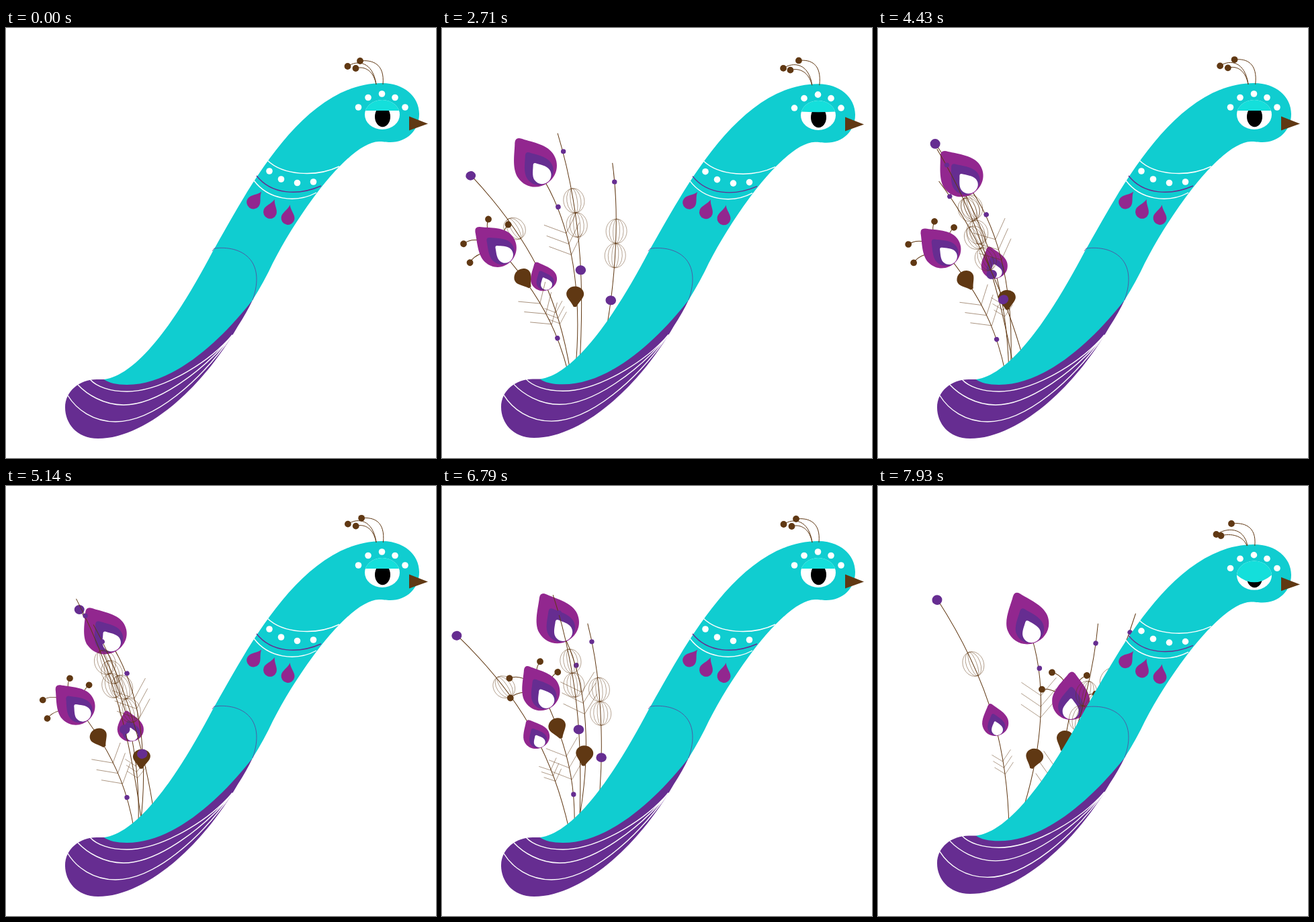
Animation, 640 px wide and 640 px high, one loop 8 s. Source, as an HTML page:

```html
<!DOCTYPE html>
<html lang="en">
<head>
<meta charset="utf-8">
<title>Peacock</title>
<style>
html, body { margin: 0; width: 100%; height: 100%; overflow: hidden; background: #fff; }
svg { display: block; width: 100vw; height: 100vh; }
</style>
</head>
<body>
<svg id="stage" viewBox="0 0 640 640"></svg>
<script>
const LOOP = 8000;
const TEAL = '#10cdd0', LID = '#14dfdb', PURPLE = '#662d91', MAGENTA = '#92278f', BROWN = '#603813';

// Motion helpers
const ease = (t, from, to) => {
  const u = Math.min(1, Math.max(0, (t - from) / (to - from)));
  return u * u * (3 - 2 * u);
};
const wave = (t, peak, period) => Math.cos(2 * Math.PI * (t - peak) / period);
const mix = (a, b, u) => a + (b - a) * u;

// Markup helpers
const dot = (x, y, r, fill, rx = r) => `<ellipse cx="${x}" cy="${y}" rx="${rx}" ry="${r}" fill="${fill}"/>`;
const line = (d, stroke, width, extra = '') =>
  `<path d="${d}" fill="none" stroke="${stroke}" stroke-width="${width}" ${extra}/>`;
const shape = (d, fill, extra = '') => `<path d="${d}" fill="${fill}" ${extra}/>`;
const at = (x, y, angle, scale, inner) =>
  `<g transform="translate(${x} ${y}) rotate(${angle}) scale(${scale})">${inner}</g>`;
const stem = d => line(d, BROWN, 1);

const EYE = 'M-5 -33Q0 -39 5 -33C12 -23 28 -8 28 7C28 24 15 35 0 35C-15 35 -28 24 -28 7C-28 -8 -12 -23 -5 -33Z';
const eyespot = (x, y, angle, scale) => at(x, y, angle, scale,
  shape(EYE, MAGENTA) +
  shape(EYE, PURPLE, 'transform="translate(0 10.5) scale(.67)"') +
  shape(EYE, '#fff', 'transform="translate(0 19) scale(.43)"'));

const bud = (x, y, angle) => at(x, y, angle, 1,
  shape('M-2 17C-6 9 -13 4 -13 -2A13 11.5 0 0 1 13 -2C13 4 6 9 2 17Z', BROWN));

const cage = (x, y, angle) => at(x, y, angle, 1, [15.5, 10.5, 5].map(rx =>
  `<ellipse rx="${rx}" ry="19" fill="none" stroke="${BROWN}" stroke-width=".7" opacity=".65"/>`).join(''));

// Three V-shaped barbs stepping down along the stem
const barbs = (x, y, stepX, stepY, left, right) => [0, 1, 2].map(i => {
  const px = x + i * stepX, py = y + i * stepY;
  return line(`M${px + left[0]} ${py + left[1]}L${px} ${py}L${px + right[0]} ${py + right[1]}`,
    BROWN, .7, 'opacity=".7"');
}).join('');

const antenna = (x, y, cx, cy, ex, ey) =>
  line(`M${x} ${y}Q${cx} ${cy} ${ex} ${ey}`, BROWN, 1) + dot(x, y, 4.9, BROWN);

// Each feather fans out from its hidden angle, sways, then folds back
const feathers = [
  {
    pivot: [195, 540], hidden: 46, enter: 1960, leave: 7680,
    sway: t => -5 + 8.2 * wave(t, 5110, 4200),
    stretch: t => .935 + .05 * wave(t, 4150, 3800),
    art: stem('M195 540C198 400 170 290 90 163') + barbs(186, 408, 2, 9.5, [-16, -10], [12, -18]) +
      cage(143, 260.5, -20) + eyespot(174, 345, -16, .7) + dot(89.5, 163.5, 7.5, PURPLE)
  },
  {
    pivot: [195, 540], hidden: 27, enter: 1900, leave: 7537,
    sway: t => -13.6 + 5.3 * wave(t, 6460, 5400),
    stretch: t => .975 - .025 * wave(t, 5110, 4400),
    art: stem('M195 540C235 440 265 310 222 200') + barbs(243, 310, -.3, 16.5, [-29, -20], [23, -27]) +
      dot(241, 269, 3.8, PURPLE) + bud(233, 403, 15) + eyespot(220.5, 193.5, -21, 1.13)
  },
  {
    pivot: [195, 545], hidden: 50, enter: 1840, leave: 7283,
    sway: t => -11.8 + 11 * wave(t, 6790, 6720) ** 3,
    stretch: t => .996 - .022 * wave(t, 5110, 4400),
    art: stem('M195 545C203 470 198 400 148 301') + barbs(187, 404, 4, 17, [-30, -12], [17, -28]) +
      dot(197, 460, 3.7, PURPLE) + bud(174.5, 361, -18) +
      antenna(104, 288, 114, 284, 126, 289) + antenna(105, 317, 112, 310, 126, 309) +
      antenna(150, 264, 144, 271, 144, 284) + antenna(176, 280, 169, 283, 162, 295) +
      eyespot(147, 302, -31, 1)
  },
  {
    pivot: [206, 517], hidden: 42, enter: 1740, leave: 7110,
    sway: t => -2.8 - 7 * wave(t, 4550, 3800),
    stretch: t => .973 + .024 * wave(t, 3430, 2360),
    art: stem('M204 517C203 400 195 280 146 147') + dot(156.5, 174.5, 3.7, PURPLE) +
      cage(177.5, 249, -12) + cage(184.5, 286, -8) + dot(195, 355, 7.3, PURPLE, 7.8)
  },
  {
    pivot: [212, 530], hidden: 29, enter: 1650, leave: 7220,
    sway: t => -8.5 - 15 * wave(t, 4550, 3400),
    stretch: t => .967 + .033 * wave(t, 3430, 2360),
    art: stem('M225 530C245 420 242 280 219 183') + dot(225, 212, 3.7, PURPLE) +
      cage(235.5, 288, -4) + cage(237.5, 326, -3) + dot(238, 396, 7.3, PURPLE, 7.8)
  }
];

// Crest plumes: tip, handles, root, sag while ducking, kick after it
const plumes = [
  { tip: [527, 49], h1: [18, -2], h2: [564, 53], root: [561, 84], sag: [-1, 2], kick: [5.5, -3] },
  { tip: [508.5, 57], h1: [15, -10], h2: [546, 50], root: [551, 84], sag: [-5, 10], kick: [1, -1] },
  { tip: [520.5, 60], h1: [14, -4], h2: [547, 64], root: [551, 84], sag: [-10, 9], kick: [.5, -1] }
];

const BELLY = 'C320 465 250 531 180 531C165 531 152 528 146 523';
const BACK = 'C200 516 262 420 308 332C358 245 440 82 560 82C592 82 615 102 615 128C615 152 597 170 572 170' +
  'C565 170 561 169 555 169C512 170 438 270 397 350Q385 376 367 405';
const neckDrop = (x, y, angle) => at(x, y, angle, 1,
  shape('M0 -17C2 -9 10 -4 10 3A10 10 0 0 1 -10 3C-10 -4 -2 -9 0 -17Z', MAGENTA));
const whites = list => list.map(([x, y]) => dot(x, y, 4.8, '#fff')).join('');

const stage = document.getElementById('stage');
stage.innerHTML = `
<defs><clipPath id="socket"><ellipse cx="560" cy="129" rx="26" ry="22"/></clipPath></defs>
${feathers.map(f => `<g class="feather">${f.art}</g>`).join('')}
<g id="bird">
  ${shape('M367 405Q358 424 345 444C290 540 205 611 137 611C105 611 88 588 88 565C88 540 110 523 135 523L146 523L180 530Z', PURPLE)}
  ${shape('M146 523' + BACK + BELLY + 'Z', TEAL)}
  ${line('M337 457C300 500 230 541 180 541C155 541 135 534 125 523', '#fff', 1.4)}
  ${line('M337 457C295 510 225 561 175 561C145 561 120 545 107 531', '#fff', 1.4)}
  ${line('M337 457C290 525 220 586 163 586C130 586 105 568 92 547', '#fff', 1.4)}
  ${line('M307 332L310 328C350 323 388 345 367 405', PURPLE, .7)}
  ${line('M389 197C412 219 460 223 496 206', '#fff', 1.4)}
  ${line('M373 220C395 248 435 250 469 235', PURPLE, 1.4)}
  ${line('M369 227C390 255 430 262 462 245', '#fff', 1.4)}
  ${whites([[392, 213], [409.5, 225], [433.5, 230.5], [457.5, 229]])}
  ${neckDrop(370, 257, 37)}${neckDrop(394, 271, 20)}${neckDrop(420, 280, 9)}
  ${whites([[524.5, 118], [539, 103.5], [559.5, 98], [579, 103.5], [594, 118]])}
  ${dot(560, 129, 22, '#fff', 26)}
  ${dot(560.5, 132, 15.3, '#000', 11.5)}
  <path id="lid" fill="${LID}" clip-path="url(#socket)"/>
  ${shape('M600 131.5L628 142.5L600 152.5Z', BROWN)}
</g>
<g id="crest">${plumes.map(() => line('', BROWN, 1) + dot(0, 0, 4.9, BROWN)).join('')}</g>`;

const bird = document.getElementById('bird');
const lidPath = document.getElementById('lid');
const groups = [...stage.querySelectorAll('.feather')];
const crest = [...document.getElementById('crest').children];

function drawFeather(f, g, t) {
  const [x, y] = f.pivot;
  const open = ease(t, f.enter, f.enter + 900) - ease(t, f.leave, f.leave + 1000);
  g.setAttribute('visibility', t < f.enter ? 'hidden' : 'visible');
  g.setAttribute('transform', `translate(${x} ${y}) rotate(${mix(f.hidden, f.sway(t), open)}) ` +
    `scale(1 ${f.stretch(t)}) translate(${-x} ${-y})`);
}

function drawPlume(p, i, duck, kick) {
  const drop = 5 * duck;
  const dx = p.sag[0] * duck + p.kick[0] * kick;
  const dy = p.sag[1] * duck + p.kick[1] * kick;
  const x = p.tip[0] + dx, y = p.tip[1] + dy + drop;
  const [path, ball] = crest.slice(2 * i, 2 * i + 2);
  path.setAttribute('d', `M${x} ${y}C${x + p.h1[0]} ${y + p.h1[1]} ` +
    `${p.h2[0] + dx * .35} ${p.h2[1] + dy * .5 + drop} ${p.root[0] + dx * .2} ${p.root[1] + drop}`);
  ball.setAttribute('cx', x);
  ball.setAttribute('cy', y);
}

function draw(t) {
  feathers.forEach((f, i) => drawFeather(f, groups[i], t));

  const duck = ease(t, 1150, 1600) - ease(t, 2100, 3000) + ease(t, 7180, 7800);
  bird.setAttribute('transform', `translate(0 376) scale(1 ${1 - .017 * duck}) translate(0 -376)`);

  const sag = 15 * (ease(t, 1150, 1500) - ease(t, 1500, 2950) + ease(t, 7220, 7980));
  const edge = 123 + sag * .1;
  lidPath.setAttribute('d', `M530 100H590V${edge}Q560 ${edge + sag * 2} 530 ${edge}Z`);

  const kick = ease(t, 2100, 3000) - ease(t, 2900, 6790);
  plumes.forEach((p, i) => drawPlume(p, i, duck, kick));
}

const start = performance.now();
function tick() {
  draw((performance.now() - start) % LOOP);
  requestAnimationFrame(tick);
}
draw(0);
requestAnimationFrame(tick);
</script>
</body>
</html>
```
